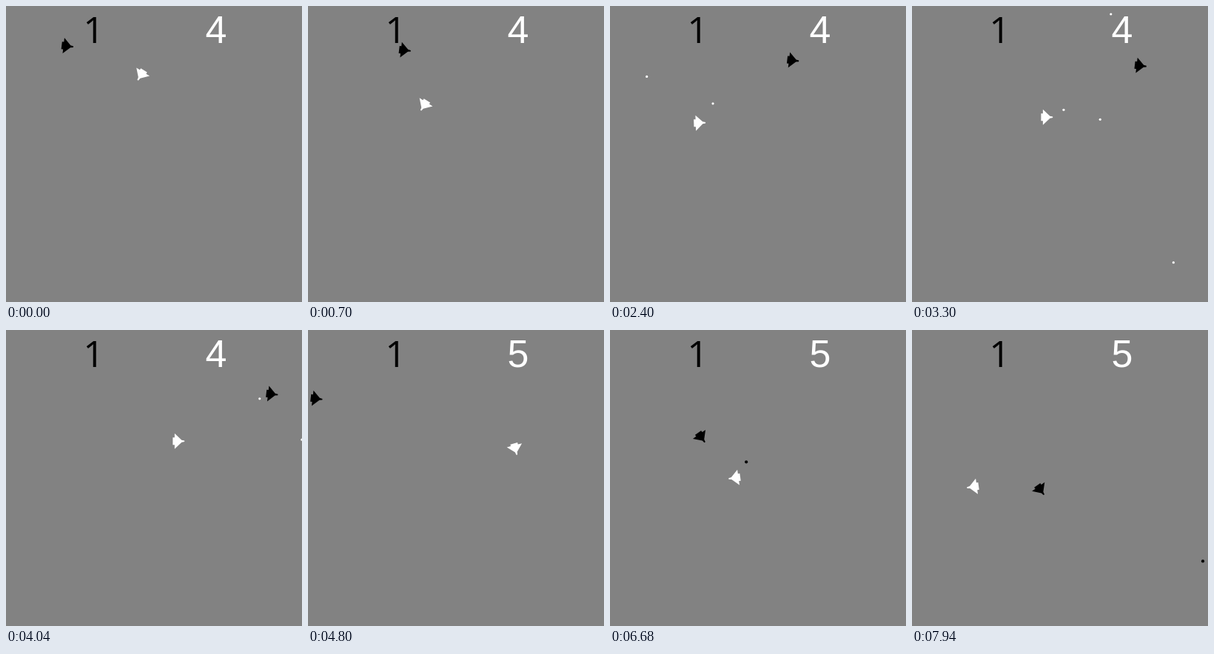
Recreate the animation shown at these times as an HTML page with a canvas. Size 400 by 400 pixels, loop 7960 ms.

```html
<!DOCTYPE html>
<html>
<head>
<meta charset="utf-8">
<style>
html, body { margin: 0; width: 100%; height: 100%; overflow: hidden; background: #828282; }
canvas { display: block; }
</style>
</head>
<body>
<canvas id="stage" width="400" height="400"></canvas>
<script>
const ctx = document.getElementById('stage').getContext('2d');
const LOOP = 7960, STEP = 20, HIT = 4150;
const SHIP_SPEED = 0.0689, SHOT_SPEED = 0.197, SHOT_LIFE = 1800, MUZZLE = 4;
const wrap = v => ((v % 400) + 400) % 400;
const clamp = v => Math.min(1, Math.max(0, v));

// Ships fly at constant speed; each turn is [from ms, to ms, degrees].
const black = {
  color: '#000', x: 81.7, y: 54, angle: 6.7, dot: 2.1,
  turns: [[5600, 5750, 35], [6040, 6170, -9], [6420, 6600, 22]],
  fires: [6170]
};
const white = {
  color: '#fff', x: 183, y: 92.4, angle: 122, dot: 1.6,
  turns: [[1496, 2343, 236], [2830, 3060, -17], [3180, 3280, 19], [4560, 4815, 80], [4815, 5339, 92]],
  fires: [1909, 2196, 2765, 3130]
};
const ships = [black, white];
const hull = new Path2D('M-4-10.5L5.5-1.5L9.3-.8V.8L5.5 1.5L-4 10.5L-4 5H-6.5V-5H-4Z');

function heading(ship, t) {
  const turned = ship.turns.reduce((sum, [a, b, deg]) => sum + deg * clamp((t - a) / (b - a)), 0);
  return (ship.angle + turned) * Math.PI / 180;
}

function pose(ship, t) {
  let { x, y } = ship;
  for (let s = 0; s < t; s += STEP) {
    const d = Math.min(STEP, t - s), a = heading(ship, s + d / 2);
    x += Math.cos(a) * SHIP_SPEED * d;
    y += Math.sin(a) * SHIP_SPEED * d;
  }
  return { x, y, a: heading(ship, t) };
}

function drawShip(ship, t) {
  const { x, y, a } = pose(ship, t);
  ctx.save();
  ctx.translate(wrap(x), wrap(y));
  ctx.rotate(a);
  ctx.fillStyle = ship.color;
  ctx.fill(hull);
  ctx.restore();
}

function drawShots(ship, t) {
  ctx.fillStyle = ship.color;
  ship.fires.forEach((born, i) => {
    // White's last shot scores
    const end = ship === white && i === ship.fires.length - 1 ? HIT : born + SHOT_LIFE;
    if (t < born || t >= end) return;
    const { x, y, a } = pose(ship, born), d = MUZZLE + SHOT_SPEED * (t - born);
    ctx.beginPath();
    ctx.arc(wrap(x + Math.cos(a) * d), wrap(y + Math.sin(a) * d), ship.dot, 0, 7);
    ctx.fill();
  });
}

function score(text, x, y, color, font) {
  ctx.font = font;
  ctx.fillStyle = color;
  ctx.fillText(text, x, y);
}

function draw(now) {
  const t = Math.floor((now % LOOP) / STEP) * STEP;
  ctx.fillStyle = '#828282';
  ctx.fillRect(0, 0, 400, 400);
  score('1', 104.3, 50, black.color, '50px "Open Sans", sans-serif');
  score(t < HIT ? '4' : '5', 269.5, 49.5, white.color, '52px "Liberation Sans", Arial, sans-serif');
  ships.forEach(s => drawShots(s, t));
  ships.forEach(s => drawShip(s, t));
}

const start = performance.now();
(function tick() {
  draw(performance.now() - start);
  requestAnimationFrame(tick);
})();
</script>
</body>
</html>
```
